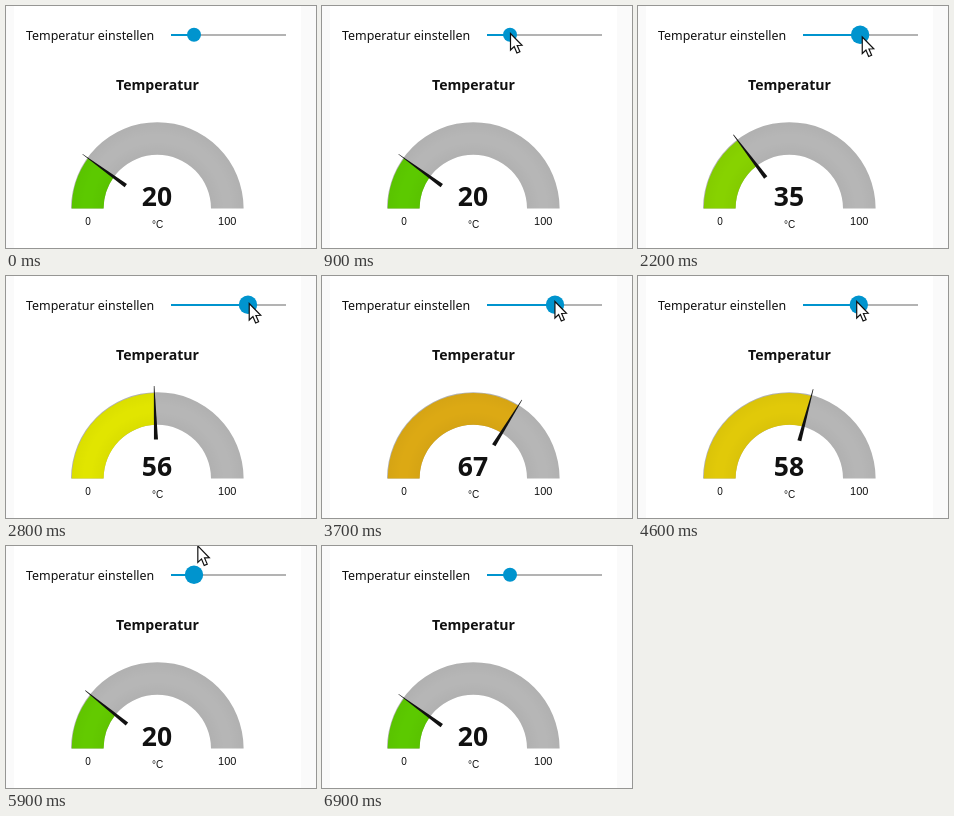
Write an HTML page with a canvas that moves like this. It is 310 px wide and 242 px high and loops after 7 s.

```html
<!DOCTYPE html>
<html lang="de">
<head>
<meta charset="utf-8">
<title>Temperatur</title>
<style>
  html, body { margin: 0; width: 100%; height: 100%; overflow: hidden; background: #fafafa; }
  canvas { display: block; width: 310px; height: 242px; }
</style>
</head>
<body>
<canvas id="stage"></canvas>
<script>
const W = 310, H = 242, LOOP = 7000, STEP = 100;
const UI = '"Noto Sans", "Open Sans", sans-serif';
const SMALL = '"Liberation Sans", Arial, sans-serif';
const BLUE = '#0094ce', INK = '#111';
const SLIDER = { x: 165, y: 29, w: 115 };
const GAUGE = { x: 151.3, y: 202.5, outer: 86.3, inner: 53.7 };

const LAG = 400;                      // number behind slider
const WINDOW = { from: 230, to: 1000 }; // needle averages this stretch of the past
const LEAD = 40;                      // pointer ahead of slider

// Key points: [ms, value]
const VALUE = [[1050, 20], [3080, 69.5], [3850, 58], [4300, 58], [5220, 20]];
const HAND_Y = [[250, -22], [900, 27], [1200, 27], [2200, 30.5], [2800, 27], [3700, 25], [5450, 25], [6300, -22]];
const RADIUS = [[1050, 7], [1200, 9.2], [6800, 9.2], [6900, 7]];

const canvas = document.getElementById('stage');
const ctx = canvas.getContext('2d');
const ratio = window.devicePixelRatio || 1;
canvas.width = W * ratio;
canvas.height = H * ratio;

const mix = (a, b, k) => a + (b - a) * k;
const smooth = k => k * k * (3 - 2 * k);

// Eases from each key point to the next
function track(keys, t) {
  const i = keys.findIndex(key => t < key[0]);
  if (i === 0) return keys[0][1];
  if (i < 0) return keys[keys.length - 1][1];
  const [t0, a] = keys[i - 1], [t1, b] = keys[i];
  return mix(a, b, smooth((t - t0) / (t1 - t0)));
}

const valueAt = t => track(VALUE, t);
const thumbX = value => SLIDER.x + SLIDER.w * value / 100;

function levelAt(t) {
  const n = 20;
  let sum = 0;
  for (let i = 0; i < n; i++) {
    sum += valueAt(t - mix(WINDOW.from, WINDOW.to, (i + 0.5) / n));
  }
  return sum / n;
}

function levelColor(level) {
  const green = [0, 181, 0], yellow = [230, 230, 0], red = [202, 56, 56];
  const [a, b] = level < 50 ? [green, yellow] : [yellow, red];
  const k = level % 50 / 50;
  return `rgb(${a.map((c, i) => Math.round(mix(c, b[i], k)))})`;
}

function text(str, x, y, font, align = 'center') {
  ctx.font = font;
  ctx.textAlign = align;
  ctx.fillStyle = INK;
  ctx.fillText(str, x, y);
}

function polygon(points, fill) {
  ctx.beginPath();
  points.forEach(p => ctx.lineTo(...p));
  ctx.closePath();
  ctx.fillStyle = fill;
  ctx.fill();
}

function drawSlider(value, radius) {
  const { x, y, w } = SLIDER, thumb = thumbX(value);
  ctx.fillStyle = '#b3b3b3';
  ctx.fillRect(x, y - 1, w, 2);
  ctx.fillStyle = BLUE;
  ctx.fillRect(x, y - 1, thumb - x, 2);
  ctx.beginPath();
  ctx.arc(thumb, y - 0.2, radius, 0, Math.PI * 2);
  ctx.fill();
}

function band(to, fill, inset = 0) {
  const { x, y, outer, inner } = GAUGE;
  const end = Math.PI * (1 + to / 100);
  ctx.beginPath();
  ctx.arc(x, y, outer - inset, Math.PI, end);
  ctx.arc(x, y, inner, end, Math.PI, true);
  ctx.closePath();
  ctx.fillStyle = fill;
  ctx.fill();
}

function drawGauge(level) {
  const { x, y, outer, inner } = GAUGE;
  band(100, '#b6b6b6');
  band(level, levelColor(level), 0.8);

  const shade = ctx.createRadialGradient(x, y, inner, x, y, outer);
  shade.addColorStop(0, 'rgba(0,0,0,0.03)');
  shade.addColorStop(0.4, 'rgba(0,0,0,0)');
  shade.addColorStop(0.6, 'rgba(0,0,0,0)');
  shade.addColorStop(1, 'rgba(0,0,0,0.03)');
  band(100, shade);

  ctx.save();
  ctx.translate(x, y);
  ctx.rotate(Math.PI * (1 + level / 100));
  polygon([[39, -2], [92.5, -0.3], [92.5, 0.3], [39, 2]], INK);
  ctx.restore();
}

function drawCursor(x, y) {
  ctx.save();
  ctx.translate(x + 0.5, y + 0.5);
  polygon([[0, 0], [0, 16.5], [3.7, 13], [6.4, 19.5], [9.4, 18.2], [6.7, 12], [11.5, 11.8]], '#fff');
  ctx.strokeStyle = INK;
  ctx.lineWidth = 1.2;
  ctx.stroke();
  ctx.restore();
}

function draw(now) {
  const t = Math.floor(now % LOOP / STEP) * STEP;
  ctx.setTransform(ratio, 0, 0, ratio, 0, 0);
  ctx.fillStyle = '#fafafa';
  ctx.fillRect(0, 0, W, H);
  ctx.fillStyle = '#fff';
  ctx.fillRect(8, 0, 287, H);

  text('Temperatur einstellen', 20, 34, `12.45px ${UI}`, 'left');
  drawSlider(valueAt(t), track(RADIUS, t));

  text('Temperatur', 151.5, 84, `bold 14.1px ${UI}`);
  drawGauge(levelAt(t));
  text(Math.floor(valueAt(t - LAG)), 151, 200, `bold 26.5px ${UI}`);
  text('0', 82, 219, `10px ${SMALL}`);
  text('100', 221.2, 219, `11px ${SMALL}`);
  text('°C', 151.6, 222, `10px ${SMALL}`);

  const handY = track(HAND_Y, t);
  const drift = Math.max(0, 25 - handY) * 0.13;
  drawCursor(thumbX(valueAt(t + LEAD)) + drift, handY);
}

function tick(now) {
  draw(now);
  requestAnimationFrame(tick);
}
draw(0);
requestAnimationFrame(tick);
</script>
</body>
</html>
```
